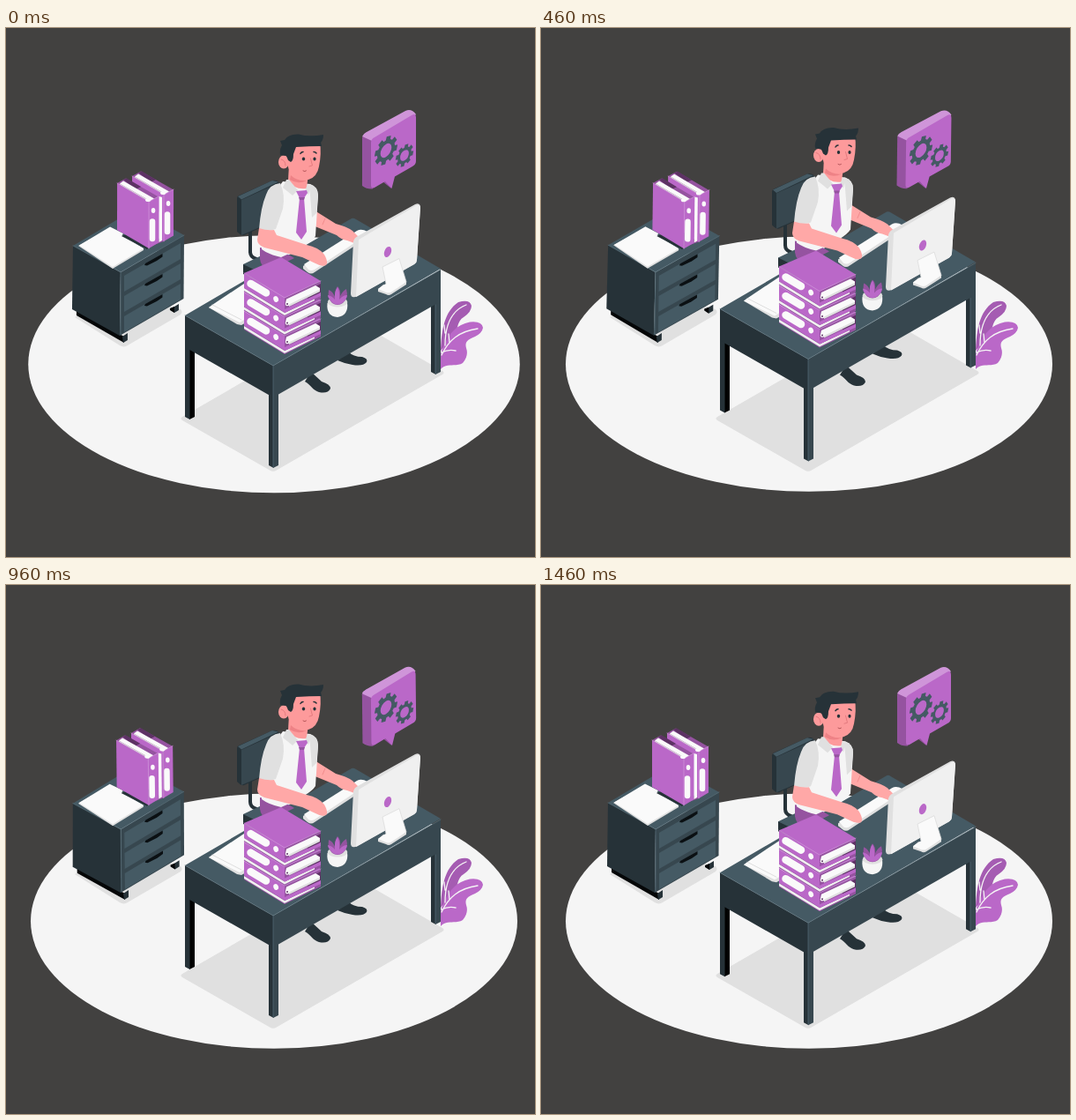
Animation of 600x600 px, one loop 1500 ms. Source, as an HTML page:

```html
<!DOCTYPE html>
<html lang="en">
<head>
<meta charset="utf-8">
<title>Office desk</title>
<style>
html, body { margin: 0; width: 100%; height: 100%; overflow: hidden; background: #424140; }
svg { display: block; width: 100vw; height: 100vh; }
.p { fill: #ba68c8 } .pd { fill: #9553a0 } .px { fill: #5d3264 } .pl { fill: #cf95d9 }
.k { fill: #263238 } .m { fill: #37474f } .l { fill: #455a64 }
.w { fill: #f5f5f5 } .ww { fill: #fafafa } .g { fill: #e0e0e0 } .f { fill: #f0f0f0 }
.skin { fill: #ffa8a7 } .face { fill: #fd9a9b }
.line { fill: none; stroke-linecap: round; stroke-linejoin: round }
</style>
</head>
<body>
<svg viewBox="0 0 600 600">
<defs>
  <g id="binder">
    <path class="pd" d="M270 294L316 322L357 302V307L316 327L270 299Z"/>
    <path class="f" d="M270 295L316 323L350 306V309L316 326L270 298Z"/>
    <path class="pd" d="M316 306L357 287V304L316 323Z"/>
    <path class="px" d="M342 298L357 290V303L342 309Z"/>
    <path class="ww" d="M318 307.500L351 292L356 295V298L321 315L317 312Z"/>
    <path class="g" d="M321 313.500L356 296.500V299L321 316Z"/>
    <path class="p" d="M316 319L357 300V304L316 323Z"/>
    <path class="p" d="M270 278L316 306V322.500L270 294.500Z"/>
    <path class="p" d="M270 278L312 260L357 287L316 306Z"/>
    <path d="M270 278L316 306L357 287" class="line" stroke="#d5a0de" stroke-width=".6"/>
    <path class="line" stroke="#fafafa" stroke-width="8.500" d="M277.500 290L295 300.500"/>
    <ellipse class="ww" cx="306" cy="307.500" rx="2.800" ry="3.500" transform="rotate(-20 306 307)"/>
    <circle class="ww" cx="319" cy="313" r="2.200"/>
    <circle class="px" cx="319" cy="313" r="1"/>
  </g>
  <g id="file">
    <path class="pd" d="M126 176L136 170.500L173 191.500L162 198Z"/>
    <path class="px" d="M133 172L137 170.500L153 180L147 183Z"/>
    <path class="ww" d="M129 176.500L133 173.500L168 193.500L164 196.500Z"/>
    <path class="g" d="M129 176.500L164 196.500V198L129 178Z"/>
    <path class="p" d="M126 176L162 197V250L126 229Z"/>
    <path class="p" d="M162 197L173 191V243.500L162 250Z"/>
    <path d="M162 197V250M126 176L162 197L173 191" class="line" stroke="#d5a0de" stroke-width=".6"/>
    <path class="line" stroke="#fafafa" stroke-width="6.500" d="M166 219.500V239"/>
    <ellipse class="ww" cx="167" cy="207" rx="2.300" ry="3"/>
    <ellipse class="ww" cx="161" cy="195" rx="3" ry="2"/>
  </g>
  <g id="drawer">
    <path class="l" d="M134 281L198 244V262L134 299Z"/>
    <path fill="#0b1013" d="M158 267L177.500 256V259.500L171 264L160 269.500L157 269Z"/>
  </g>
</defs>

<rect width="600" height="600" fill="#424140"/>
<ellipse id="floor" class="w" cx="304" cy="381.200" rx="276" ry="144.600"/>
<path class="g" d="M200 441L389 332Q392 330 396 332L495 389Q498 391 495 393L307 501.500Q303 504 299 501.500L200 445Q197 443 200 441Z"/>
<path class="g" d="M78 328L130 298L198 319Q201 322 198 325L137 360.500Q133 362.500 129 360Z"/>

<g>
  <path fill="#a55cb2" d="M493 366C494 346 496 322 513 311Q526 307 528 315Q528 322 519 328C511 333 514 340 507 350Z"/>
  <path class="p" d="M493 387V370C499 351 508 337 526 333.500Q540 332 541 340Q540 346 532 350C524 353 520 356 522 363Q525 372 518 380C510 385 500 379 493 387Z"/>
  <path class="line" stroke="#f5f5f5" stroke-width="1.300" d="M498 360C498 340 504 321 522 314M494 371C502 354 514 344 535 341M494 368Q502 364 510 366M503 357L502 347M498 346L497 337"/>
</g>

<g id="cabinet">
  <path fill="#050708" d="M80 319L134 350V357L80 326Z"/>
  <path class="k" d="M132 350L138 346V354L133 357ZM186 319L196 313V320L191 323Z"/>
  <path fill="#050708" d="M186 318L191 316V323L186 320Z"/>
  <path class="l" d="M76 247L147 205L202 235L130 277Z"/>
  <path class="k" d="M76 247L130 277L129 349L75 319Z"/>
  <path class="m" d="M130 277L202 235L201.500 307L129 349Z"/>
  <use href="#drawer"/><use href="#drawer" y="23"/><use href="#drawer" y="46"/>
  <path class="line" stroke="#607884" stroke-width=".6" d="M76 247L130 277L202 235M130 277V348"/>
  <path class="g" d="M82 247L118 227L156 250V252L121 273Z"/>
  <path class="ww" d="M83 246.500L118 225.500L133 233L131 236L156 250L121 271Z"/>
  <path class="k" d="M131 236L140 233L164 247L160 251Z"/>
  <path class="pd" d="M165 196L179 188V242L165 247Z"/>
  <use href="#file" x="17" y="-8"/>
  <path class="ww" d="M173.500 191L177 192V241L173.500 243Z"/>
  <use href="#file"/>
</g>

<g id="desk">
  <!-- chair -->
  <path class="line" stroke="#263238" stroke-width="4" d="M277 225V254Q277 260 284 262"/>
  <path class="k" d="M262 193Q262 191 264 190L302 173Q305 172 309 174L312 216L270 235Q267 236 262 231Z"/>
  <path class="m" d="M267 195L311 175V216L267 235Z"/>
  <path class="l" d="M263 191L302 173L309 174.500L267 194.500Z"/>
  <path class="l" d="M269 268L292 257L350 272L316 296L270 276Z"/>
  <path class="k" d="M269 268L310 288V298L269 279Z"/>

  <!-- shoes -->
  <path class="k" d="M339 401L346 390L358 401Q368 404 368 409Q365 415 355 413C348 411 346 405 339 401ZM376 377L388 367Q394 373 404 373Q411 375 409 379Q405 384 393 382Q385 381 376 377Z"/>

  <!-- table -->
  <path fill="#000" d="M208 360L214 366V441L208 444Z"/>
  <path class="k" d="M203 355L208.500 360V444L203 441ZM482 310L487.500 307V393L482 390ZM298 410L303.500 413V499L298 496Z"/>
  <path class="m" d="M487 307L493 304V390L487 393ZM303 412L309 408V496L303 499Z"/>
  <path class="l" d="M203 326L392 216Q394 215 397 217L493 273L303 383Z"/>
  <path class="k" d="M203 326L303 383V419L203 362Z"/>
  <path class="m" d="M303 383L493 274V310L303 419Z"/>
  <path class="line" stroke="#607884" stroke-width=".6" d="M203 326L303 383L493 274M303 383V498M487 314V392"/>

  <!-- keyboard -->
  <path class="g" d="M337 270L399 232L411 234V237L350 277Q346 280 342 277L337 273Z"/>
  <path class="ww" d="M338 268L398 230Q403 227 410 231V234L350 274Q346 276 343 274Z"/>

  <!-- person -->
  <path class="pd" d="M288 249L315 254L327 261L298 275Q289 271 288 262Z"/>
  <path class="skin" d="M350 207L374 222Q386 225 393 230L399 236Q400 243 395 244L387 241Q380 240 375 235L348 224Z"/>
  <path class="line" stroke="#ee8586" stroke-width=".8" d="M359 223L362 216"/>
  <path class="w" d="M314 174L345 177Q354 180 354 190L351 236Q345 246 312 260Q298 257 290 251V238L302 190Z"/>
  <path class="g" d="M344 177Q354 180 354 190L352 210L347 215Z"/>
  <path class="g" d="M311 176Q299 177 295 189Q289 203 287 228Q297 231 306 228L314 205Q317 189 311 176Z"/>
  <path class="skin" d="M287 227Q296 230 304 229L307 235L341 246Q355 249 361 257Q366 266 363 269Q358 271 351 267L336 260L293 249Q285 246 285 240Z"/>
  <path class="face" d="M321 155L320 173Q327 184 341 182L343 165Z"/>
  <path class="g" d="M318 172L314 181L325 190L331 184L321 172Z"/>
  <path class="g" d="M342 177L346 180L343 189L339 185Z"/>
  <path class="p" d="M329 185L341 184L342 187L338 193L341 231L335 240L329 232L333 193Z"/>
  <path class="pd" d="M332 192L339 192L338 195L333 195Z"/>

  <ellipse class="face" cx="315" cy="152" rx="6" ry="7.500"/>
  <path class="face" d="M322 135L356 130Q358 142 355 157Q353 169 343 172Q330 173 322 164L318 151Z"/>
  <path class="k" d="M320 150L318 145L311 144Q310 138 313 133L311 128L316 127Q320 120 332 120.500Q344 124 360 121Q360 127 357 130L358 134Q344 134 329 135L326 143Q326 151 323 152Z"/>
  <path class="line" stroke="#e47c80" stroke-width="1" d="M345.500 148L347.500 156L344 157M312 149Q317 150 317 156"/>
  <path fill="#ee8286" d="M323 167Q330 174 341 173Q331 178 322 172Z"/>
  <ellipse class="k" cx="337.500" cy="148.500" rx="1.700" ry="2"/>
  <ellipse class="k" cx="350" cy="148.500" rx="1.600" ry="2"/>
  <path class="line" stroke="#263238" stroke-width="1.500" d="M334 142.500Q335 140.500 337 140.500M349 140.500Q351 140.500 352 142"/>
  <path class="line" stroke="#a34449" stroke-width=".8" d="M337 162Q339 163.500 340.500 162"/>

  <!-- monitor -->
  <path class="g" d="M394 242Q395 238 399 236L464 200Q469 198 470 202L466 263Q466 266 463 268L398 304.500Q391 307 391 301Z"/>
  <path class="f" d="M400 240L465 201.500Q469 199 470 204L466 263Q466 266 463 268L397 305Z"/>
  <ellipse class="p" cx="433" cy="254" rx="3.800" ry="6.300" transform="rotate(20 433 254)"/>
  <path class="g" d="M422 296L428 291L454 288V291L437 302Q434 304 431 302L422 299Z"/>
  <path class="ww" d="M422 296L431 290L427 271L446 261.500L454 288L437 299.500Q434 301 431 300Z"/>
  <path class="line" stroke="#dcdcdc" stroke-width=".8" d="M431 290L427 271L446 261.500L454 288"/>

  <!-- pot -->
  <path class="w" d="M364.500 312Q363 327 376 328Q389 326 387 311Z"/>
  <ellipse class="g" cx="376" cy="311" rx="11.300" ry="5.500"/>
  <path class="pd" d="M370 312C364 306 366 300 366 297Q371 299 373 305Q373 297 376 293Q380 297 379 304Q382 298 386 296Q389 306 382 312Q376 316 370 312Z"/>
  <path class="p" d="M371 312Q365 307 365 303Q370 304 373 308Q372 299 376 294Q379 299 378 308Q382 303 387 303Q386 309 381 312Q376 315 371 312Z"/>

  <!-- papers and binders -->
  <path class="g" d="M230 317L265 295L303 317L267 337L262 336Z"/>
  <path class="ww" d="M234 314L270 290L302 311L265 334L230 317Z"/>
  <path class="line" stroke="#d2d2d2" stroke-width=".7" d="M234 314L267 331"/>
  <use href="#binder" y="43"/><use href="#binder" y="21.500"/><use href="#binder"/>
</g>

<g id="bubble">
  <path class="pd" d="M404 124L409 118L416 126V182.500Q409 183 404 179Z"/>
  <path class="pd" d="M427 174L437 182L434 172Z"/>
  <path class="pl" d="M404 123Q405 120 409 118L453 94Q460 91 465 98L459 104L415 128Z"/>
  <path class="p" d="M414 130Q414 126 418 124L460 99Q465 96 465 102V151Q465 155 461 157L441 168.500L437.500 182L430 174L418 181Q414 183 414 178Z"/>
  <g id="gears" fill="#455a64" fill-rule="evenodd"></g>
</g>
</svg>
<script>
const LOOP = 1500, STEP = 1000 / 24;
const $ = id => document.getElementById(id);

// Toothed ring lying on the right-hand isometric plane.
function gear(cx, cy, r) {
  const pts = [], inner = r * .76, hole = r * .48;
  for (let i = 0; i < 8; i++) {
    for (const [d, rad] of [[-.27, inner], [-.19, r], [.19, r], [.27, inner]]) {
      const a = i * Math.PI / 4 + d + .25;
      pts.push((rad * Math.cos(a)).toFixed(2) + ' ' + (rad * Math.sin(a)).toFixed(2));
    }
  }
  const ring = `M${hole} 0A${hole} ${hole} 0 1 0 ${-hole} 0A${hole} ${hole} 0 1 0 ${hole} 0Z`;
  return `<path transform="matrix(.866 -.5 0 1 ${cx} ${cy})" d="M${pts.join('L')}Z${ring}"/>`;
}
$('gears').innerHTML = gear(431, 139, 15.2) + gear(452, 144.5, 11.8);

// Linear interpolation through [position, value] stops.
function track(stops, p) {
  let i = 1;
  while (i < stops.length - 1 && p > stops[i][0]) i++;
  const [a, u] = stops[i - 1], [b, v] = stops[i];
  return u + (v - u) * (p - a) / (b - a);
}
const beat = [[0, 1], [.1, 1.1], [.3, 1], [.4, 1], [.5, 1.1], [.6, 1], [1, 1]];
const lift = [[0, 0], [.5, -12], [1, 0]];
const sway = [[0, 0], [.25, 1], [.75, -1], [1, 0]];

function draw(now) {
  const k = Math.floor((now % LOOP + 5) / STEP) % 36;
  const p = (15 + 1.017 * k * STEP) / LOOP % 1;
  const s = track(beat, p), turn = track(sway, p);
  $('floor').setAttribute('rx', 276 * s);
  $('floor').setAttribute('ry', 144.6 * s);
  $('desk').setAttribute('transform', `translate(0 ${track(lift, p) + .2})`);
  $('cabinet').setAttribute('transform', `rotate(${turn} 138.5 260)`);
  $('bubble').setAttribute('transform', `rotate(${turn} 434.5 138)`);
  requestAnimationFrame(draw);
}
draw(performance.now());
</script>
</body>
</html>
```
